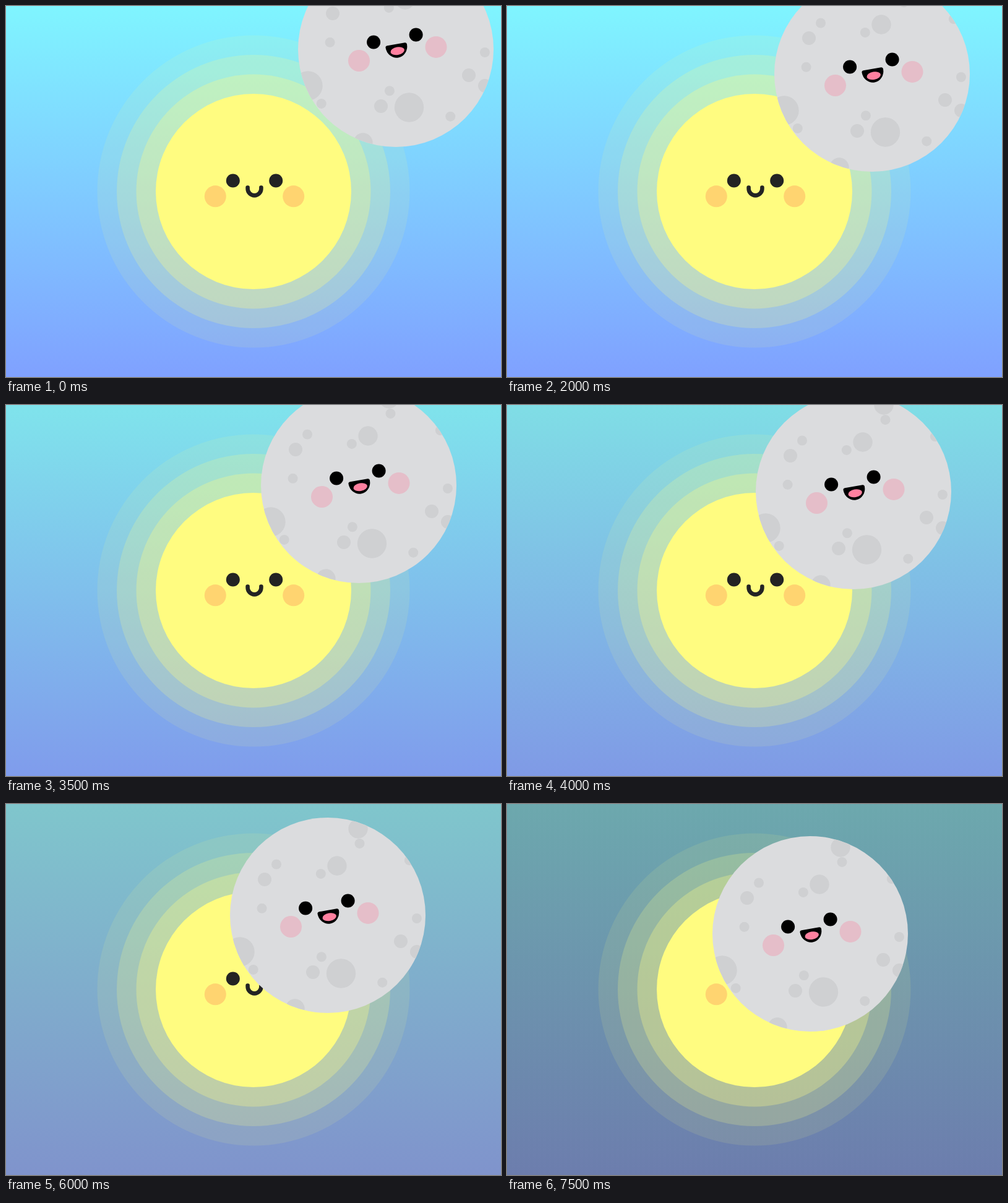
An HTML page for the animation above (8 s loop, 800x600 px).

```html
<!DOCTYPE html>
<html lang="en">
<head>
<meta charset="utf-8">
<title>Eclipse</title>
<style>
  html, body { margin: 0; width: 100%; height: 100%; overflow: hidden; }
  svg { display: block; width: 100%; height: 100%; }
</style>
</head>
<body>
<svg viewBox="0 0 800 600">
  <defs>
    <linearGradient id="sky" x2="0" y2="1">
      <stop id="top"/>
      <stop id="bottom" offset="1"/>
    </linearGradient>
    <clipPath id="disc"><circle r="158"/></clipPath>
  </defs>
  <rect width="800" height="600" fill="url(#sky)"/>

  <g transform="translate(400 300)" fill="#fffc80">
    <g id="glow"></g>
    <circle r="158"/>
    <g fill="#ffd470">
      <circle cx="-61.7" cy="7.8" r="17.5"/>
      <circle cx="64.7" cy="7.8" r="17.5"/>
    </g>
    <g fill="#232323">
      <circle cx="-33.2" cy="-17.5" r="11"/>
      <circle cx="36.2" cy="-17.5" r="11"/>
    </g>
    <path d="M-9.4-6.5v2a10.9 10.9 0 0 0 21.8 0v-2" fill="none" stroke="#232323" stroke-width="6.6" stroke-linecap="round"/>
  </g>

  <g id="moon">
    <circle r="158" fill="#dbdcde"/>
    <g id="craters" fill="#cfd0d2" clip-path="url(#disc)"></g>
    <g fill="#e5bec9">
      <circle cx="-59.5" cy="18.5" r="17.5"/>
      <circle cx="65" cy="-3.6" r="17.5"/>
    </g>
    <circle cx="-35.9" cy="-11.5" r="11"/>
    <circle cx="32.6" cy="-23.5" r="11"/>
    <g transform="translate(1.8 .6) rotate(-10)">
      <path d="M-14.5-6H14.5A14.5 16 0 0 1-14.5-6Z" stroke="#000" stroke-width="6" stroke-linejoin="round"/>
      <ellipse cx=".5" cy="2.3" rx="11.3" ry="6.3" fill="#ff809f"/>
    </g>
  </g>
</svg>
<script>
const $ = id => document.getElementById(id);
const LOOP = 8000, STEP = 500;
const circle = (x, y, r, opacity = 1) =>
  `<circle cx="${x}" cy="${y}" r="${r}" opacity="${opacity}"/>`;

// Three rings, each narrower and denser than the last
$('glow').innerHTML = [3, 2, 1].map(n => circle(0, 0, 158 + 31.5 * n, (4 - n) / 10)).join('');

// Large craters by radius, relative to the moon's centre
const large = {
  11: [[-102, -58], [-24, 92], [118, 42], [144, 59]],
  15.7: [[49, -140], [15, -80], [-53, 151]],
  23.7: [[-142, 59], [21.5, 94]]
};
// Small craters go once around the moon, bunched a little towards the end
const smallDistances = [144, 140, 68, 149, 107, 117, 68, 127, 159];
const smallCrater = (distance, i) => {
  const angle = (2 + 40.5 * i + 22 * Math.sin(Math.PI * i / 8)) * Math.PI / 180;
  return circle(distance * Math.cos(angle), distance * Math.sin(angle), 8);
};
$('craters').innerHTML = [
  ...Object.entries(large).flatMap(([r, spots]) => spots.map(([x, y]) => circle(x, y, r))),
  ...smallDistances.map(smallCrater)
].join('');

// Hues stay fixed; the strongest channel fades, then the weakest follows
function paintSky(step) {
  const since = n => Math.max(0, step - n);
  const high = 1 - 0.025 * since(4) - 0.015 * since(12);
  const low = Math.min(0.5, 0.625 * high);
  const light = (high + low) / 2;
  const saturation = (high - low) / (1 - Math.abs(2 * light - 1));
  const color = hue => `hsl(${hue}, ${saturation * 100}%, ${light * 100}%)`;
  $('top').setAttribute('stop-color', color(184.7));
  $('bottom').setAttribute('stop-color', color(224.4));
}

function draw(now) {
  const step = Math.floor(now % LOOP / STEP);
  // The moon rests for one step when the sky starts to darken
  const shift = 10 * (step < 5 ? step : step - 1);
  $('moon').setAttribute('transform', `translate(${630 - shift} ${70 + shift})`);
  paintSky(step);
}

const start = performance.now();
function tick() {
  draw(performance.now() - start);
  requestAnimationFrame(tick);
}
tick();
</script>
</body>
</html>
```
